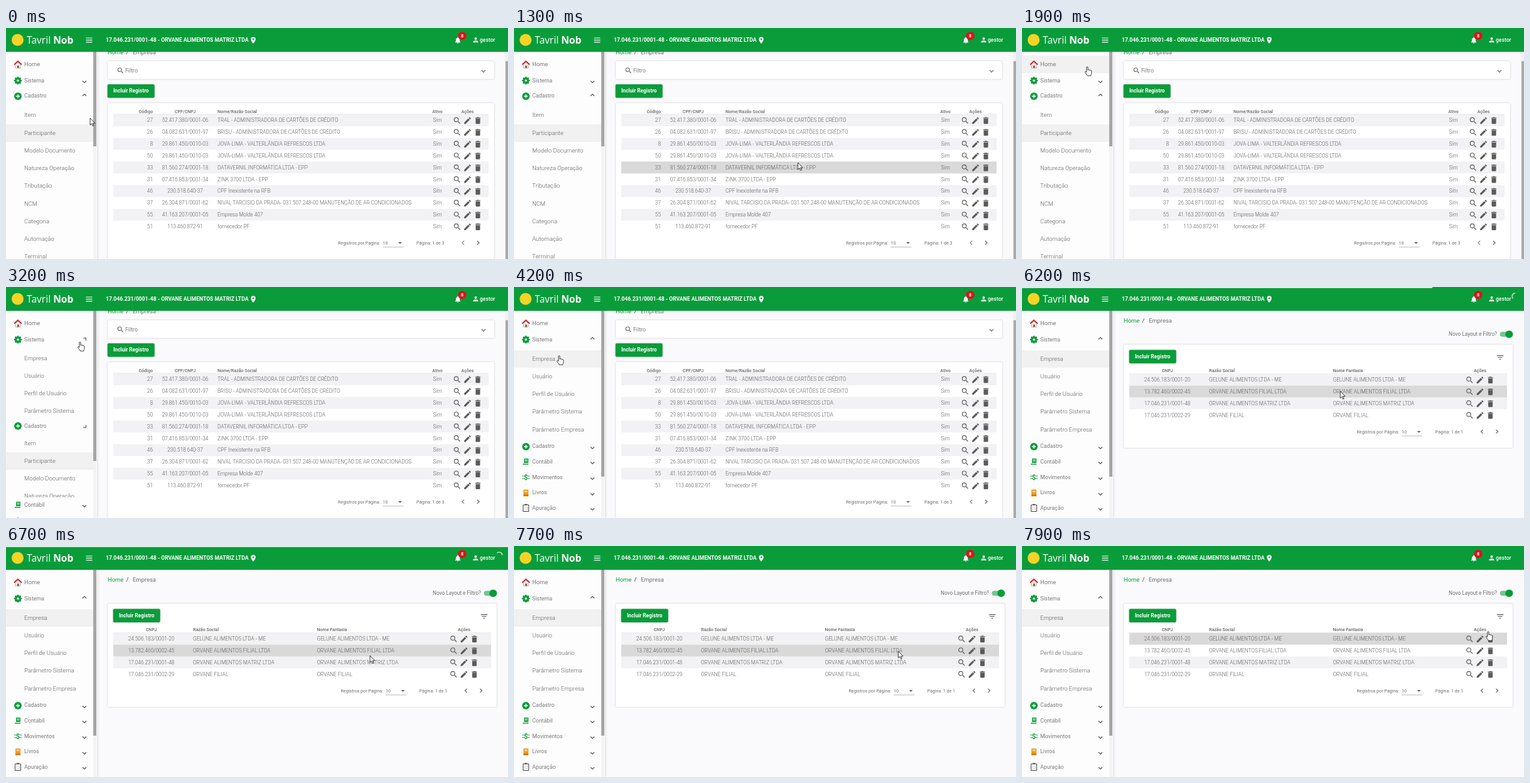
An HTML page that plays this animation: 800x369 px, repeating every 8 s.

```html
<!DOCTYPE html>
<html lang="pt-BR">
<head>
<meta charset="utf-8">
<title>Cadastro de empresas</title>
<style>
html, body { margin: 0; width: 100%; height: 100%; overflow: hidden; background: #faf9fb; }
body { position: relative; font-family: Roboto, sans-serif; }
svg.layer { position: absolute; left: 0; top: 0; width: 800px; height: 369px; }
text { font-family: Roboto, sans-serif; white-space: pre; }
.card { filter: drop-shadow(0 .8px .8px rgba(0,0,0,.24)); }
.bar { filter: drop-shadow(0 .5px .8px rgba(0,0,0,.22)); }

#side { position: absolute; left: 0; top: 38px; width: 145px; height: 331px; padding-top: 5.5px;
  box-sizing: border-box; overflow: hidden; background: #fdfdfd; box-shadow: 0 0 4px rgba(0,0,0,.22); color: #7a7a7a; }
#side div { box-sizing: border-box; }
.head, .home, .sub { position: relative; width: 139px; padding-left: 29px; white-space: nowrap; }
.head { height: 24.7px; line-height: 24.7px; font-size: 8.8px; }
.home { height: 28px; line-height: 28px; font-size: 9.4px; }
.sub { height: 28.25px; line-height: 28.25px; font-size: 9.45px; font-weight: 300; color: #5c5c5c; }
.on { background: #f1f1f2; }
.head svg, .home svg { position: absolute; width: 14px; height: 14px; left: 11.5px; top: 50%; margin-top: -7px; }
.head svg.chev { left: 117.5px; }
.panel { overflow: hidden; padding-top: 4.5px; }
#rail { position: absolute; left: 138.5px; top: 0; width: 5.5px; height: 331px; background: #f3f3f3; }
#thumb { margin-left: .5px; width: 4.5px; background: #a6a6a6; }

#panelA, #panelB, #thumb, #chevA, #chevB {
  animation: 8s cubic-bezier(.4,0,.2,1) infinite; }
#panelA { animation-name: openA; }
#panelB { animation-name: closeB; }
#thumb { animation-name: thumb; }
#chevA { animation-name: flipA; }
#chevB { animation-name: flipB; }
@keyframes openA { 0%, 37.5% { height: 0; padding-top: 0; } 42.5%, 100% { height: 146px; padding-top: 4.5px; } }
@keyframes closeB { 0%, 37.5% { height: 458px; padding-top: 4.5px; } 42.5%, 100% { height: 0; padding-top: 0; } }
@keyframes thumb { 0%, 37.5% { height: 151px; } 42.5%, 100% { height: 265px; } }
@keyframes flipA { 0%, 37.5% { transform: none; } 42.5%, 100% { transform: rotate(-180deg); } }
@keyframes flipB { 0%, 37.5% { transform: rotate(-180deg); } 42.5%, 100% { transform: none; } }

#list, #fresh, #wait, #result { animation: 8s step-end infinite; }
#list { animation-name: list; }
#fresh { animation-name: fresh; }
#wait { animation-name: wait; }
#result { animation-name: result; }
@keyframes list { 0% { visibility: visible; } 58.75%, 100% { visibility: hidden; } }
@keyframes fresh { 0% { visibility: hidden; } 58.75%, 100% { visibility: visible; } }
@keyframes wait { 0% { visibility: hidden; } 58.75% { visibility: visible; } 70%, 100% { visibility: hidden; } }
@keyframes result { 0% { visibility: hidden; } 70%, 100% { visibility: visible; } }
#busy { animation: busy 8s linear infinite; }
#load { animation: load 8s ease-out infinite; }
@keyframes busy { 0%, 69.9% { opacity: 0; } 70%, 85% { opacity: 1; } 88.75%, 100% { opacity: 0; } }
@keyframes load { 0%, 69.9% { transform: scaleX(0); } 80% { transform: scaleX(.9); } 82%, 100% { transform: none; } }
.spin { transform-box: fill-box; transform-origin: center; animation: spin 1s -.9s linear infinite; }
.fast { animation-duration: .4s; animation-delay: -.1s; }
@keyframes spin { to { transform: rotate(360deg); } }
</style>
</head>
<body>
<svg class="layer" id="main"></svg>
<div id="side"></div>
<svg class="layer" id="top"></svg>
<script>
const GREEN = '#0a9c3a', GREY = '#707070', INK = '#5c5c5c';
const $ = id => document.getElementById(id);

const ICON = {
  search: 'M15.5 14h-.79l-.28-.27A6.47 6.47 0 0 0 16 9.5 6.5 6.5 0 1 0 9.5 16c1.61 0 3.09-.59 4.23-1.57l.27.28v.79l5 4.99L20.49 19zm-6 0a4.5 4.5 0 1 1 0-9 4.5 4.5 0 0 1 0 9z',
  edit: 'M3 17.25V21h3.75L17.81 9.94l-3.75-3.75zM20.71 7.04a1 1 0 0 0 0-1.41l-2.34-2.34a1 1 0 0 0-1.41 0l-1.83 1.83 3.75 3.75z',
  trash: 'M6 19a2 2 0 0 0 2 2h8a2 2 0 0 0 2-2V7H6zM19 4h-3.5l-1-1h-5l-1 1H5v2h14z',
  bell: 'M12 22a2 2 0 0 0 2-2h-4a2 2 0 0 0 2 2zm6-6v-5c0-3-1.6-5.6-4.5-6.3V4a1.5 1.5 0 0 0-3 0v.7C7.6 5.4 6 7.9 6 11v5l-2 2v1h16v-1z',
  person: 'M12 12a4 4 0 1 0 0-8 4 4 0 0 0 0 8zm0 2c-2.7 0-8 1.3-8 4v2h16v-2c0-2.7-5.3-4-8-4z',
  pin: 'M12 2a7 7 0 0 0-7 7c0 5.25 7 13 7 13s7-7.75 7-13a7 7 0 0 0-7-7zm0 9.5a2.5 2.5 0 1 1 0-5 2.5 2.5 0 0 1 0 5z',
  down: 'M7.41 8.59 12 13.17l4.59-4.58L18 10l-6 6-6-6z',
  left: 'M15.41 7.41 14 6l-6 6 6 6 1.41-1.41L10.83 12z',
  right: 'M8.59 16.59 13.17 12 8.59 7.41 10 6l6 6-6 6z',
  filter: 'M10 18h4v-2h-4zM3 6v2h18V6zm3 7h12v-2H6z'
};

const icon = (name, x, y, fill = '#5a5a5a', k = .589) =>
  `<path d="${ICON[name]}" fill="${fill}" transform="translate(${x - 12 * k} ${y - 12 * k}) scale(${k})"/>`;
const text = (x, y, s, size = 8.25, fill = INK, weight = 300, anchor = 'start') =>
  `<text x="${x}" y="${y}" font-size="${size}" fill="${fill}" font-weight="${weight}" text-anchor="${anchor}">${s}</text>`;
const rect = (x, y, w, h, fill, more = '') =>
  `<rect x="${x}" y="${y}" width="${w}" height="${h}" fill="${fill}" ${more}/>`;
const card = (y, h, w = 616) => rect(162, y, w, h, '#fff', 'rx="2" class="card"');
const title = (x, y, s, anchor) => text(x, y, s, 7.1, '#666', 500, anchor);

const PITCH = 18.85;
const button = (x, y) => rect(x - .3, y, 75, 21.5, GREEN, 'rx="2" class="card"') +
  text(x + 37.2, y + 13.3, 'Incluir Registro', 8.25, '#fff', 700, 'middle');
const crumbs = y => text(162, y, 'Home', 9.4, GREEN, 400) + text(191.5, y, '/', 9.4, '#333', 400) +
  text(202, y, 'Empresa', 9.4, GREY, 400);

// cols: [x, anchor] per cell
function table(id, top, width, rows, cols, actions) {
  const band = (i, fill, more) => rect(171, top + PITCH * i, width, PITCH, fill, more);
  let s = rect(171, top - .5, width, .6, '#ddd');
  rows.forEach((_, i) => { if (i % 2 === 0) s += band(i, '#f2f1f3'); });
  s += band(0, '#d9d9da', `id="${id}" visibility="hidden"`);
  rows.forEach((row, i) => {
    const y = top + PITCH * (i + .5);
    row.forEach((cell, c) => s += text(cols[c][0], y + 2.9, cell, 8.25, INK, 300, cols[c][1]));
    ['search', 'edit', 'trash'].forEach((n, k) => s += icon(n, actions + 16.5 * (k - 1), y + .5));
  });
  return s;
}

const pager = (x, y, pages, prev, next) =>
  text(x, y + 2.5, 'Registros por Página:', 7.1, GREY, 400) + text(x + 71.5, y + 2.5, '10', 7.1, GREY, 400) +
  rect(x + 71.5, y + 6.6, 33, .7, '#999') +
  `<path d="M${x + 96} ${y - 1}h6l-3 3z" fill="#666"/>` +
  text(x + 125, y + 2.5, 'Página: 1 de ' + pages, 7.1, GREY, 400) +
  icon('left', x + 199.5, y, prev) + icon('right', x + 223.5, y, next);

const drinks = 'JOVA-LIMA - VALTERLÂNDIA REFRESCOS LTDA';
const people = [
  ['27', '52.417.380/0001-06', 'TRAL - ADMINISTRADORA DE CARTÕES DE CRÉDITO'],
  ['26', '04.082.631/0001-97', 'BRISU - ADMINISTRADORA DE CARTÕES DE CRÉDITO'],
  ['8', '29.861.450/0010-03', drinks],
  ['50', '29.861.450/0010-03', drinks],
  ['33', '81.560.274/0001-18', 'DATAVERNIL INFORMÁTICA LTDA - EPP'],
  ['31', '07.416.853/0001-34', 'ZINK 3700 LTDA - EPP'],
  ['46', '230.518.640-37', 'CPF Inexistente na RFB'],
  ['37', '26.304.871/0001-62', 'NIVAL TARCISIO DA PRADA- 031.507.248-00 MANUTENÇÃO DE AR CONDICIONADOS'],
  ['55', '41.163.207/0001-05', 'Empresa Molde 407'],
  ['51', '113.460.872-91', 'fornecedor PF']
].map(r => [...r, 'Sim']);

const OWN = '17.046.231/0001-48', HQ = 'ORVANE ALIMENTOS MATRIZ LTDA';
const firms = [
  ['24.506.183/0001-20', 'GELUNE ALIMENTOS LTDA - ME'],
  ['13.782.460/0002-45', 'ORVANE ALIMENTOS FILIAL LTDA'],
  [OWN, HQ],
  ['17.046.231/0002-29', 'ORVANE FILIAL']
].map(r => [...r, r[1]]);

const TOP_A = 138, TOP_B = 138.7;

$('main').innerHTML = `
<g id="list">
  ${crumbs(41.5)}
  ${card(53, 28.5)}${icon('search', 182.5, 68, '#666', .54)}${text(190, 70.6, 'Filtro', 8.8, '#7a7a7a', 400)}${icon('down', 761, 69)}
  ${button(162, 90)}
  ${card(120, 249)}
  ${title(234, 135.6, 'Código', 'end')}${title(285.5, 135.6, 'CPF/CNPJ', 'middle')}${title(337, 135.6, 'Nome/Razão Social')}
  ${title(687.5, 135.6, 'Ativo', 'middle')}${title(735.5, 135.6, 'Ações', 'middle')}
  ${table('hoverA', TOP_A, 598, people, [[234, 'end'], [285.5, 'middle'], [337], [687.5, 'middle']], 735.5)}
  ${pager(529, 343, 3, '#808080', '#555')}
  ${rect(795.5, 38, 4.5, 331, '#f1f1f1')}${rect(796, 53, 4, 316, '#a9a9a9')}
</g>
<g id="fresh">
  ${crumbs(56.5)}
  ${text(757, 78, 'Novo Layout e Filtro?', 8.25, GREY, 400, 'end')}
  ${rect(761.5, 71.5, 21, 8, '#76c592', 'rx="4"')}<circle cx="776.3" cy="75.5" r="6" fill="${GREEN}"/>
</g>
<g id="wait"><circle class="spin" cx="472" cy="100.5" r="9" fill="none" stroke="#4bb26d" stroke-width="1.3" pathLength="100" stroke-dasharray="85 15"/></g>
<g id="result">
  ${card(92, 165, 620)}${button(171, 100.5)}${icon('filter', 762, 112.5)}
  ${title(231.5, 136, 'CNPJ', 'middle')}${title(298, 136, 'Razão Social')}${title(495.5, 136, 'Nome Fantasia')}${title(730, 136, 'Ações', 'middle')}
  ${table('hoverB', TOP_B, 602, firms, [[231.5, 'middle'], [298], [495.5]], 730)}
  ${pager(533.5, 231, 1, '#666', '#666')}
</g>`;

// Menu glyphs share a 14 x 14 box
const GLYPH = {
  home: '<path d="M3 7v6h8V7L7 3.5z" fill="#f4efe9" stroke="#888" stroke-width=".6"/><path d="M1 7.5 7 2l6 5.5" fill="none" stroke="#d3202b" stroke-width="1.7"/><path d="M6 9h2.5v4H6z" fill="#8a4b2a"/>',
  gear: `<circle cx="7" cy="7" r="3.5" fill="none" stroke="${GREEN}" stroke-width="3.4"/><circle cx="7" cy="7" r="5.4" fill="none" stroke="${GREEN}" stroke-width="1.8" pathLength="16" stroke-dasharray="1 1" stroke-dashoffset=".5"/>`,
  plus: `<circle cx="7" cy="7" r="6" fill="${GREEN}"/><path d="M7 4v6M4 7h6" stroke="#fff" stroke-width="1.4"/>`,
  ledger: `<path d="M4 2h7v7H4z" fill="${GREEN}"/><path d="M5 4h5M5 6h5" stroke="#fff" stroke-width=".9"/><path d="M2 10h9v2H2z" fill="#48b56b"/>`,
  money: `<path d="M1 5h3M1 9h3M10 5h3M10 9h3" stroke="${GREEN}"/><text x="7" y="11" font-size="11" font-weight="700" text-anchor="middle" fill="${GREEN}">$</text>`,
  book: '<path d="M3 1.5h8v11H3z" fill="#f29a1f"/><path d="M4.5 3.5h5v2h-5z" fill="#ffe1a8"/><path d="M3 10.7h8" stroke="#8d5a16"/>',
  board: '<path d="M2.5 2h9v10.5h-9z" fill="#fff" stroke="#444"/><path d="M5 1.5h4" stroke="#444" stroke-width="1.6"/><path d="M4.5 6h1.5M4.5 9h1.5M8 6h2M8 9h2" stroke="#777" stroke-width=".8"/>'
};
const glyph = n => `<svg viewBox="0 0 14 14">${GLYPH[n]}</svg>`;
const head = (n, label, id = '') => `<div class="head">${glyph(n)}${label}` +
  `<svg class="chev" ${id && `id="${id}"`} viewBox="0 0 14 14"><path d="m4 7.5 3 3 3-3" fill="none" stroke="#555" stroke-width="1.2"/></svg></div>`;
const sub = (label, more = '') => `<div class="sub ${more}">${label}</div>`;

$('side').innerHTML = `<div class="home" id="home">${glyph('home')}Home</div>` +
  head('gear', 'Sistema', 'chevA') +
  `<div class="panel" id="panelA">${['Empresa', 'Usuário', 'Perfil de Usuário', 'Parâmetro Sistema', 'Parâmetro Empresa'].map(s => sub(s)).join('')}</div>` +
  head('plus', 'Cadastro', 'chevB') +
  `<div class="panel" id="panelB">${['Item', 'Participante', 'Modelo Documento', 'Natureza Operação', 'Tributação', 'NCM', 'Categoria', 'Automação', 'Terminal']
    .map((s, i) => sub(s, i === 1 ? 'on' : '')).join('')}</div>` +
  head('ledger', 'Contábil') + head('money', 'Movimentos') + head('book', 'Livros') + head('board', 'Apuração') +
  '<div id="rail"><div id="thumb"></div></div>';

$('top').innerHTML = `
${rect(0, 0, 800, 38, GREEN, 'class="bar"')}
<circle cx="18.5" cy="19" r="9.5" fill="#f5d327"/>
<text x="33" y="25" font-size="15.6" fill="#fff" style="font-family:'Open Sans',sans-serif">Tavril <tspan font-weight="700">Nob</tspan></text>
<path d="M127.5 16h10M127.5 19.3h10M127.5 22.6h10" stroke="#fff" stroke-width="1.2"/>
${text(159, 22.3, `${OWN} - ${HQ}`, 8.6, '#fff', 700)}
${icon('pin', 394, 19.5, '#fff', .53)}
${icon('bell', 720, 19.5, '#fff', .52)}
<circle cx="727.1" cy="12.6" r="6.7" fill="#dc141c"/>${text(727.1, 15.2, '8', 7.1, '#fff', 700, 'middle')}
${icon('person', 748.5, 19, '#fff', .5)}${text(755, 22.1, 'gestor', 8.6, '#fff', 500)}
<g id="busy">
  ${rect(0, 0, 800, 1.6, '#f4fff8', 'id="load"')}
  <circle class="spin fast" cx="786" cy="14.8" r="5" fill="none" stroke="#e8fff0" stroke-width="1.2" pathLength="100" stroke-dasharray="0 62 38 0"/>
</g>
<g id="cursor" stroke="#222" stroke-width=".9" stroke-linejoin="round" fill="#fff">
  <path id="arrow" d="M0 0v11l2.6-2.3 1.7 3.9 1.7-.8-1.7-3.7h3.5z"/>
  <path id="hand" d="M-1.2-1.5c0-1.5 2.2-1.5 2.2 0v4.3c.3-1 2-.8 2 .3.4-.9 2-.6 2 .4.6-.6 1.8-.2 1.8.8v3.4c0 2-1 2.6-1 4H.2c0-1.5-3.7-4.3-3.7-6 0-1 1.3-1.2 2.3.4z"/>
</g>`;

// Pointer stops: time, x, y, easing
const LINEAR = p => p, IN = p => p * p, OUT = p => p * (2 - p), BOTH = p => p * p * (3 - 2 * p);
const stops = [
  [0, 134, 144], [50, 134, 144], [900, 609, 283, BOTH], [1020, 609, 283], [1300, 452.5, 215, IN],
  [1900, 104, 64.5, OUT], [1950, 104, 64.5], [2500, 118, 90.5, BOTH], [3720, 118, 90.5],
  [4200, 72, 112.5, BOTH], [4600, 71, 115.5], [5560, 71, 115.5], [6400, 580, 175, BOTH],
  [7620, 580, 175], [7900, 743, 139.3, BOTH], [8000, 743, 139.3]
];
function pointer(t) {
  const i = stops.findIndex(s => s[0] > t);
  const [t0, x0, y0] = stops[i - 1], [t1, x1, y1, ease = LINEAR] = stops[i];
  const p = ease((t - t0) / (t1 - t0));
  return [x0 + (x1 - x0) * p, y0 + (y1 - y0) * p];
}

function hover(id, top, count, x, y) {
  const i = Math.floor((y - top) / PITCH), hit = x > 171 && x < 769 && i >= 0 && i < count;
  $(id).setAttribute('visibility', hit ? 'inherit' : 'hidden');
  if (hit) $(id).setAttribute('y', top + PITCH * i);
  return hit;
}

const company = document.querySelector('#panelA .sub');
let start;
function draw(now) {
  start ??= now;
  const t = (now - start) % 8000, [x, y] = pointer(t);
  hover('hoverA', TOP_A, people.length, x, y);
  const onRow = hover('hoverB', TOP_B, firms.length, x, y);
  const hand = x < 128 || (t > 5600 && onRow && x > 706 && x < 754);
  $('cursor').setAttribute('transform', `translate(${x} ${y})`);
  $('arrow').style.display = hand ? 'none' : '';
  $('hand').style.display = hand ? '' : 'none';
  $('home').classList.toggle('on', x < 139 && y > 43.5 && y < 71.5);
  company.classList.toggle('on', t >= 3900);
  requestAnimationFrame(draw);
}
requestAnimationFrame(draw);
</script>
</body>
</html>
```
